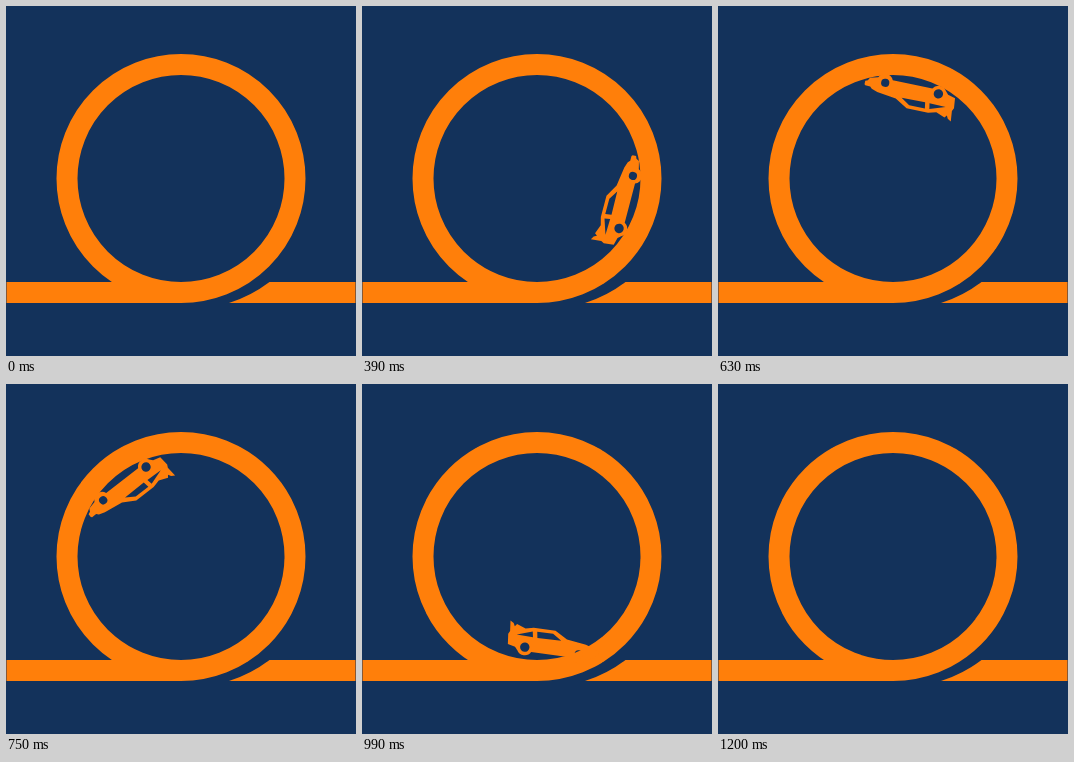
An HTML page for the animation above (1320 ms loop, 350 px wide and 350 px high).

```html
<!DOCTYPE html>
<html lang="en">
<head>
<meta charset="utf-8">
<title>Loop the loop</title>
<style>
  html, body { margin: 0; width: 100%; height: 100%; overflow: hidden; background: #13325b; }
  svg { display: block; width: 100vw; height: 100vh; }
</style>
</head>
<body>
<svg viewBox="0 0 350 350">
  <rect width="350" height="350" fill="#13325b"/>
  <g fill="#ff7f0a">
    <circle cx="175" cy="172.5" r="114" fill="none" stroke="#ff7f0a" stroke-width="21"/>
    <path d="M.5 276H175V297H.5Z"/>
    <path d="M349.5 276H263.5A135 135 0 0 1 223 297H349.5Z"/>
    <path id="car" fill-rule="evenodd" d="
      M-45 -24.5L-41.5 -22.5L-40 -19.5L-38 -22L-29 -18.5L-21 -20.5H1L13.5 -13.3
      L33 -10.5L39 -8.5L41 -6.5L46 -6.5L47 -5.5V-2L44.5 -1L43 2L34.9 4
      A8 8 0 0 1 20.1 4H-20.3A8 8 0 0 1 -34.3 4L-37 1L-44.5 -1L-45.5 -11L-44 -14Z
      M-17 -17H-1L8 -11.2L-16 -10.8Z
      M-37 -11.5L-21.5 -16.6L-20.5 -11Z
      M-32 0a4.7 4.7 0 1 0 9.4 0a4.7 4.7 0 1 0 -9.4 0Z
      M22.9 0a4.1 4.1 0 1 0 8.2 0a4.1 4.1 0 1 0 -8.2 0Z"/>
  </g>
</svg>
<script>
const car = document.getElementById('car');
const CX = 175, CY = 172.5, R = 96, LAP = 2 * Math.PI * R;
const HALF_BASE = 27.5, PERIOD = 1320, STEP = 30;

// time (ms), distance along the track from the foot of the loop, speed
const keys = [
  [0, -222, .967], [210, -19, .95], [390, 126, .7], [630, 282, .64],
  [750, 365, .82], [960, 589, 1.05], [990, 618, .967], [1200, 824, .98]
];

function distance(t) {
  let i = 0;
  while (i < keys.length - 2 && t >= keys[i + 1][0]) i++;
  const [t0, s0, v0] = keys[i], [t1, s1, v1] = keys[i + 1];
  const d = t1 - t0, u = Math.min(1, (t - t0) / d), w = 1 - u;
  return w * w * (1 + 2 * u) * s0 + u * u * (3 - 2 * u) * s1
       + d * u * w * (w * v0 - u * v1);
}

// wheel position: straight, one lap, straight
function track(s) {
  if (s < 0) return [CX + s, CY + R];
  if (s > LAP) return [CX + s - LAP, CY + R];
  return [CX + R * Math.sin(s / R), CY + R * Math.cos(s / R)];
}

function draw(t) {
  const s = distance(t);
  const [ax, ay] = track(s - HALF_BASE), [bx, by] = track(s + HALF_BASE);
  // the tail kicks up briefly on leaving the loop
  const kick = Math.exp(-(((t - 995) / 30) ** 2));
  const angle = Math.atan2(by - ay, bx - ax) * 180 / Math.PI + 7 * kick;
  car.setAttribute('transform',
    `translate(${(ax + bx) / 2} ${(ay + by) / 2 - 1.3 * kick}) rotate(${angle})`);
  car.setAttribute('visibility', t > 0 && t < 1200 ? 'visible' : 'hidden');
}

const start = performance.now();
function tick() {
  const t = (performance.now() - start) % PERIOD;
  draw(Math.floor(t / STEP) * STEP);
  requestAnimationFrame(tick);
}
tick();
</script>
</body>
</html>
```
